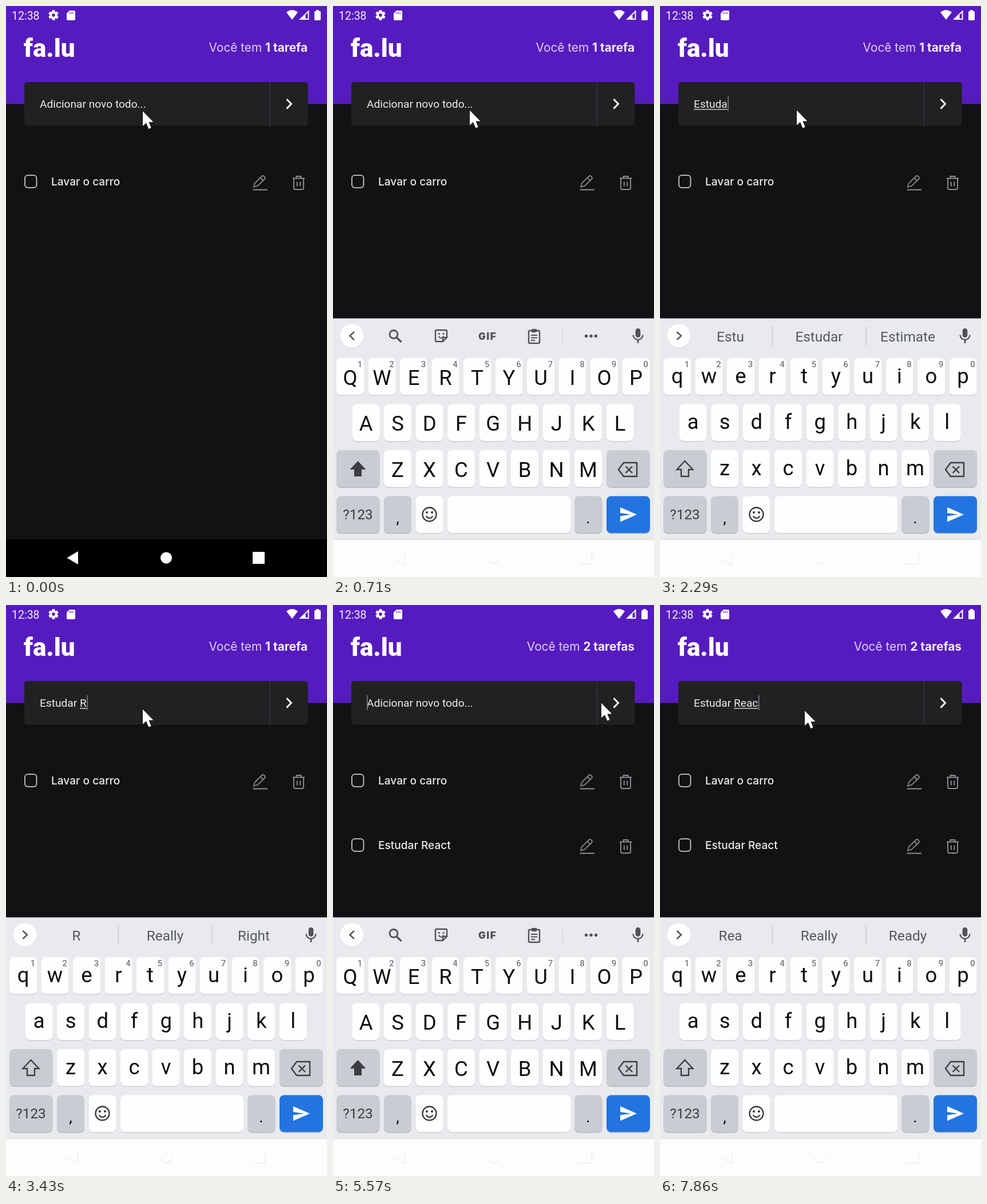
Animation, 561 px wide and 999 px high, one loop 8000 ms. Source, as an HTML page with a canvas:

```html
<!DOCTYPE html>
<html lang="pt-BR">
<head>
<meta charset="utf-8">
<title>Lista de tarefas</title>
<style>
html, body { margin: 0; width: 100%; height: 100%; overflow: hidden; background: #000; }
canvas { display: block; width: 561px; height: 999px; }
</style>
</head>
<body>
<canvas id="stage"></canvas>
<script>
const W = 561, H = 999, LOOP = 8000;
const canvas = document.getElementById('stage');
const ctx = canvas.getContext('2d');
const ratio = window.devicePixelRatio || 1;
canvas.width = W * ratio;
canvas.height = H * ratio;

const ROBOTO = 'Roboto, sans-serif', INTER = 'Inter, sans-serif';
const PURPLE = '#561bbe', DARK = '#131114', ICON = '#505256', LETTER = '#0c0d0e';

// Seven picture changes per second
const TICKS = [0, 140, 290, 430, 570, 710, 860];
const PHRASE = 'Estudar React';
const STROKES = [10, 12, 13, 14, 15, 16, 17, 18, 23, 25, 26, 27, 29];
const ADDED = 38, RETYPE = 43;
const HINTS = [
  'E Enjoy Even', 'Es Est Essay', 'Est Estate Estimate',
  'Estu Estudar Estimate', 'Estu Estudar Estimate',
  'Estuda Estudar Estimate', 'Estuda Estudar Estimate', 'the and to',
  'R Really Right', 'Re Really Read', 'Rea Really Ready',
  'React Reaction ReactJS', 'React Reaction ReactJS'
];

function stepAt(t) {
  const ms = t % 1000;
  return Math.floor(t / 1000) * 7 + TICKS.filter(s => s <= ms).length - 1;
}

function typedAt(k) {
  if (k >= ADDED) return Math.max(0, Math.min(PHRASE.length, k - RETYPE));
  return STROKES.filter(s => s <= k).length;
}

function caretOn(k) {
  const off = [[0, 2], [5, 9], [21, 23], [33, 36], [41, 44]];
  return !off.some(([a, b]) => k >= a && k < b);
}

function pointerAt(k) {
  if (k === 0) return [239, 184];
  if (k < 31) return [239, 182.5];
  if (k < 33) return null;
  if (k === 33) return [545, 193];
  if (k < 36) return [497, 176];
  const u = Math.max(0, Math.min(1, (k - ADDED) / 5));
  const e = u * u * (3 - 2 * u);
  return [494 - 241 * e, 170 + 15 * e];
}

function box(x, y, w, h, r, color) {
  ctx.beginPath();
  ctx.roundRect(x, y, w, h, r);
  ctx.fillStyle = color;
  ctx.fill();
}

function frame(x, y, w, h, r, color, lw) {
  ctx.beginPath();
  ctx.roundRect(x, y, w, h, r);
  ctx.strokeStyle = color;
  ctx.lineWidth = lw;
  ctx.stroke();
}

function disc(x, y, r, color) {
  ctx.beginPath();
  ctx.arc(x, y, r, 0, 7);
  ctx.fillStyle = color;
  ctx.fill();
}

function ring(x, y, r, color, lw, from = 0, to = 2 * Math.PI) {
  ctx.beginPath();
  ctx.arc(x, y, r, from, to);
  ctx.strokeStyle = color;
  ctx.lineWidth = lw;
  ctx.stroke();
}

function trace(d, dx = 0, dy = 0) {
  const p = new Path2D();
  p.addPath(new Path2D(d), new DOMMatrix([1, 0, 0, 1, dx, dy]));
  return p;
}

function fill(d, color, dx, dy) {
  ctx.fillStyle = color;
  ctx.fill(trace(d, dx, dy));
}

function line(d, color, lw, dx, dy) {
  ctx.strokeStyle = color;
  ctx.lineWidth = lw;
  ctx.stroke(trace(d, dx, dy));
}

function text(s, x, y, font, color, align = 'left') {
  ctx.font = font;
  ctx.textAlign = align;
  ctx.fillStyle = color;
  ctx.fillText(s, x, y);
  return ctx.measureText(s).width;
}

function drawStatus() {
  text('12:38', 10, 24, '19.5px ' + ROBOTO, '#f4effc');
  ctx.save();
  ctx.translate(83, 16);
  for (let i = 0; i < 6; i++) {
    ctx.rotate(Math.PI / 3);
    box(-2.6, -8.8, 5.2, 5, 1, '#fff');
  }
  ring(0, 0, 4.7, '#fff', 3.6);
  ctx.restore();
  fill('M111 8H119Q121 8 121 10V23Q121 25 119 25H108Q106 25 106 23V13Z', '#fff');
  line('M111 11V14M114 11V14M117 11V14', PURPLE, 1.2);
  fill('M490 11Q500 3 510 11L500 24Z', '#fff');
  fill('M512 24L529.5 7V24Z', '#fff');
  fill('M523.5 15.5L527.5 11.5V22H523.5Z', PURPLE);
  box(539, 9, 11, 16, 1.5, '#fff');
  box(542, 7, 5, 3, 0.5, '#fff');
}

function drawHeader(k) {
  box(0, 0, W, 171.5, 0, PURPLE);
  drawStatus();
  text('fa.lu', 31, 89, '900 44px ' + ROBOTO, '#fff');
  const count = k < ADDED ? '1 tarefa' : '2 tarefas';
  const w = text(count, 527, 80, '700 20.8px ' + INTER, '#f3eefb', 'right');
  text('Você tem ', 527 - w, 80, '20.8px ' + INTER, '#dfd2f4', 'right');
}

function drawInput(k) {
  const font = '19.15px ' + ROBOTO, color = '#ececee';
  box(32, 133, 495.5, 76.5, 5, '#212023');
  box(460.5, 133, 1.5, 76.5, 0, '#343238');
  line('M490.5 163L498.5 171.3L490.5 179.6', '#f3f3f3', 3);
  const n = typedAt(k), value = PHRASE.slice(0, n);
  let end = 59;
  if (n) {
    end += text(value, 59, 178, font, color);
    const start = n > 8 ? 8 : 0;
    const from = ctx.measureText(PHRASE.slice(0, start)).width;
    const part = ctx.measureText(value.slice(start).trim()).width;
    box(59 + from, 180.2, part, 1.4, 0, color);
  } else {
    text('Adicionar novo todo...', 59, 178, font, color);
  }
  if (caretOn(k)) box(end + (n ? 0.5 : 0), 158, 1.8, 26, 0, '#717074');
}

function drawTask(label, y) {
  frame(33, y - 10.8, 20.5, 21.6, 5, '#c9c9cb', 1.8);
  text(label, 79, y + 7, '500 19.1px ' + INTER, '#ececee');
  const pen = '#858487', bin = '#8f8e91';
  line('M431.5 14.5H457', pen, 2.2, 0, y);
  line('M433 9.5L434.5 3.5L447 -9Q449 -11 451 -9L452 -8Q454 -6 452 -4L439.5 8L433 9.5ZM444.5 -6.5L449.5 -1.5', pen, 1.8, 0, y);
  line('M501 -5.5H522M507.5 -6V-9H515.5V-6M503 -5V11.5Q503 14 505.5 14H517.5Q520 14 520 11.5V-5', bin, 1.9, 0, y);
  line('M508.8 0.5V8.5M514.2 0.5V8.5', bin, 1.9, 0, y);
}

function key(x, y, w, color) {
  box(x, y + 1.6, w, 64.5, 8, color === '#fefefe' ? '#cdd0d4' : '#b5b8bf');
  box(x, y, w, 64.5, 8, color);
}

function letters(row, x, y, upper) {
  [...row].forEach((c, i) => {
    const kx = x + 55.5 * i;
    key(kx, y, 48, '#fefefe');
    text(upper ? c : c.toLowerCase(), kx + 24, y + (upper ? 46.5 : 43.5), '36.5px ' + ROBOTO, LETTER, 'center');
    if (row.length === 10) text((i + 1) % 10, kx + 41, y + 16, '500 15px ' + ROBOTO, '#73767b', 'center');
  });
}

function drawToolbar() {
  ring(106, 574.5, 7, ICON, 2.8);
  line('M111 580L119.5 588', ICON, 3.2);
  line('M181 567H197Q199 567 199 569V580L192 587H181Q179 587 179 585V569Q179 567 181 567ZM199 580H192V587', ICON, 2.4);
  disc(185.5, 573.5, 1.6, ICON);
  disc(193, 573.5, 1.6, ICON);
  ring(189, 576.5, 4.2, ICON, 2, 0.2, 2.9);
  ctx.letterSpacing = '1.5px';
  text('GIF', 270, 583.5, '900 17px ' + INTER, ICON, 'center');
  ctx.letterSpacing = '0px';
  frame(342, 568, 19, 22, 2, ICON, 2.4);
  box(347, 565, 9, 6, 1, ICON);
  line('M346 576H357M346 580.5H357M346 585H353', ICON, 2);
  box(400.5, 563, 1.3, 29, 0, '#d0d3d7');
  for (const x of [442.5, 451, 459.5]) disc(x, 577.5, 2.7, ICON);
}

function drawHints(n) {
  HINTS[n - 1].split(' ').forEach((word, i) =>
    text(word, 123 + 155 * i, 587, '24.4px ' + ROBOTO, '#55585c', 'center'));
  box(195.5, 561, 1.4, 33, 0, '#c3c6ca');
  box(359.5, 561, 1.4, 33, 0, '#c3c6ca');
}

function drawKeyboard(n) {
  const upper = n === 0, grey = '#caccd3';
  box(0, 546.5, W, 387.5, 0, '#e8eaed');
  disc(33, 578, 20.8, '#d9dbdf');
  disc(33, 577, 20.5, '#fefefe');
  if (upper) drawToolbar(); else drawHints(n);
  line(upper ? 'M37 570L29.5 577L37 584' : 'M29.5 570L37 577L29.5 584', ICON, 2.4);
  box(528.7, 564, 8.6, 16, 4.3, ICON);
  ring(533, 575.5, 8.5, ICON, 2.3, 0, Math.PI);
  line('M533 584V590', ICON, 2.6);

  letters('QWERTYUIOP', 6, 616, upper);
  letters('ASDFGHJKL', 33.7, 696.5, upper);
  letters('ZXCVBNM', 89, 777, upper);
  key(6, 777, 75.5, grey);
  const arrow = 'M43.5 796L57.5 811H50V823H37V811H29.5Z';
  if (upper) fill(arrow, '#3c3e42'); else line(arrow, '#3c3e42', 2.4);
  key(478, 777, 76, grey);
  line('M508 799H531V823H508L499 811ZM511.5 805.5L523 817M523 805.5L511.5 817', '#3c3e42', 2.4);

  key(6, 857.5, 75.5, grey);
  text('?123', 43.5, 898, '24.3px ' + ROBOTO, '#3c3e42', 'center');
  key(89, 857.5, 48, grey);
  text(',', 113, 905, '28px ' + ROBOTO, LETTER, 'center');
  key(144.5, 857.5, 48, '#fefefe');
  ring(168.5, 889.5, 12, '#303236', 2.3);
  disc(164, 886, 2, '#303236');
  disc(173, 886, 2, '#303236');
  ring(168.5, 890, 6, '#303236', 2.2, 0.35, 2.8);
  key(200, 857.5, 215, '#fefefe');
  key(422, 857.5, 48.5, grey);
  text('.', 446, 905, '28px ' + ROBOTO, LETTER, 'center');
  key(478, 857.5, 76, '#2374e1');
  fill('M502 877L531 889.7L502 902.5V892.5L521 889.7L502 887Z', '#fff');
}

function drawNav(color) {
  fill('M106.5 965.5L126 954V977Z', color);
  disc(280, 965.5, 10, color);
  box(431, 955, 21, 21, 1, color);
}

function drawFadedNav() {
  box(0, 934, W, 65, 0, '#fdfdfe');
  box(0, 933, W, 1.5, 0, '#e2e3e6');
  line('M107 967L125.5 978V957', '#ededef', 1.3);
  ring(280, 966, 10, '#ededef', 1.3, 0, Math.PI);
  line('M431 976.5H452.5V956', '#ededef', 1.3);
}

// Keyboard sliding in, still pale, under a translucent navigation bar
function drawEntering() {
  box(0, 546.5, W, 453, 0, '#fbf9fd');
  ctx.save();
  ctx.translate(0, 141.5);
  drawKeyboard(0);
  ctx.restore();
  const veil = ctx.createLinearGradient(0, 688, 0, 945);
  veil.addColorStop(0, 'rgba(251,249,253,0.35)');
  veil.addColorStop(0.7, 'rgba(251,249,253,0.22)');
  veil.addColorStop(1, 'rgba(251,249,253,0)');
  box(0, 688, W, 311, 0, veil);
  box(0, 933, W, 66, 0, 'rgba(0,0,0,0.4)');
  drawNav('#fff');
}

function drawPointer(k) {
  const p = pointerAt(k);
  if (!p) return;
  const d = 'M0 0V26L6 20.6L10.4 31L14.7 29.2L10.5 19H18.5Z';
  line(d, '#111', 1.4, ...p);
  fill(d, '#fff', ...p);
}

function draw(t) {
  const k = stepAt(t);
  ctx.setTransform(ratio, 0, 0, ratio, 0, 0);
  box(0, 0, W, H, 0, DARK);
  drawHeader(k);
  drawInput(k);
  drawTask('Lavar o carro', 307);
  if (k >= ADDED) drawTask(PHRASE, 420);

  if (k < 4) {
    box(0, 933, W, 66, 0, '#000');
    drawNav('#fff');
  } else if (k === 4) {
    drawEntering();
  } else {
    drawKeyboard(typedAt(k - 1));
    drawFadedNav();
  }
  drawPointer(k);
}

function loop() {
  draw(performance.now() % LOOP);
  requestAnimationFrame(loop);
}
loop();
</script>
</body>
</html>
```
